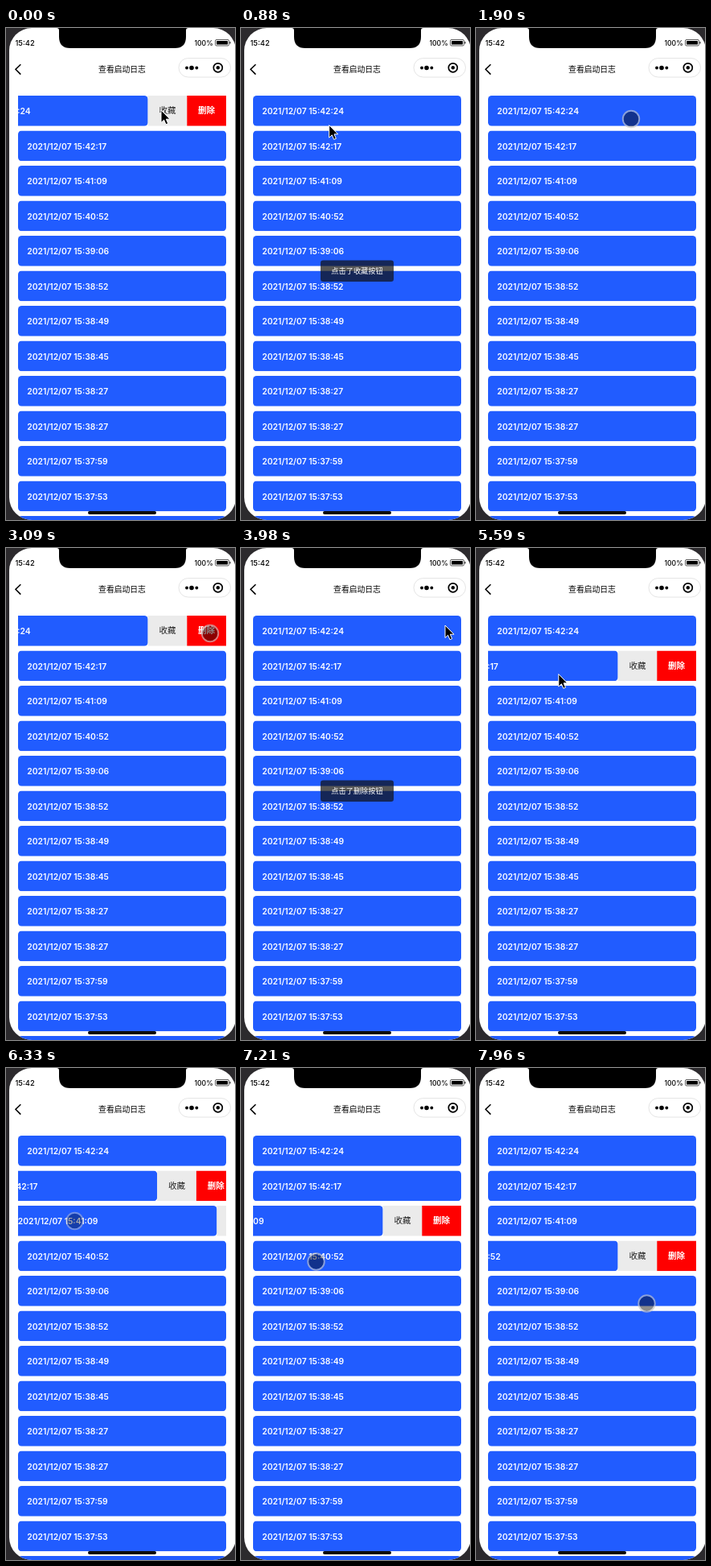
These frames come from a looping animation (285x611 px, 8 s). An HTML page:

```html
<!DOCTYPE html>
<html lang="zh">
<head>
<meta charset="utf-8">
<style>
  html, body { margin: 0; width: 100%; height: 100%; overflow: hidden; background: #2c2a2d; }
  svg { display: block; }
  text { font-family: Inter, "Noto Sans CJK SC", "Noto Sans CJK", sans-serif; dominant-baseline: central; }
  .mid { text-anchor: middle; }
  .log { font-size: 10.35px; font-weight: 600; fill: #fff; }
  .btn { font-size: 10.5px; font-weight: 500; }
  .bold { font-weight: 700; }
</style>
</head>
<body>
<svg width="285" height="611" viewBox="0 0 285 611">
  <defs>
    <clipPath id="screen"><rect x="4" width="282" height="611" rx="28"/></clipPath>
  </defs>
  <rect width="285" height="611" fill="#2c2a2d"/>
  <g clip-path="url(#screen)">
    <rect width="286" height="611" fill="#fff"/>
    <g id="rows"></g>
    <path d="M63 0Q66 0 66 3V11Q66 25 80 25H210Q224 25 224 11V3Q224 0 227 0Z"/>
    <rect x="102" y="600" width="85" height="4" rx="2" fill="#0a0a0a"/>
  </g>

  <text x="11.5" y="18.5" font-size="9.3" font-weight="500">15:42</text>
  <text x="234.5" y="19" font-size="8.6" font-weight="500">100%</text>
  <rect x="260.5" y="14.5" width="17" height="7.5" rx="1.5" fill="none" stroke="#333" stroke-width=".8"/>
  <rect x="262" y="16" width="14" height="4.5" rx=".5"/>
  <path d="M279 17v2.6" stroke="#333" stroke-width="1.2"/>

  <path d="M18.3 45.2L12 51.3L18.3 57.6" fill="none" stroke="#000" stroke-width="1.6"/>
  <text class="mid" x="144.5" y="51" font-size="9.8" font-weight="500">查看启动日志</text>
  <rect x="215" y="37.5" width="64.5" height="23.5" rx="11.7" fill="#fff" stroke="#ddd" stroke-width=".8"/>
  <circle cx="225" cy="49.5" r="1.9"/>
  <circle cx="231" cy="49.5" r="2.8"/>
  <circle cx="237.3" cy="49.5" r="1.9"/>
  <circle cx="263.8" cy="49.3" r="5.5" fill="none" stroke="#000" stroke-width="1.7"/>
  <circle cx="263.8" cy="49.3" r="2.2"/>

  <g id="toast">
    <rect x="99" y="288.6" width="91" height="26.4" rx="3.3" fill="#111" fill-opacity=".7"/>
    <text id="message" class="mid" x="144.5" y="301.8" font-size="9.2" fill="#fff"></text>
  </g>
  <g id="cursor">
    <g id="touch">
      <circle r="10.2" fill="none" stroke="#c4c4c4" stroke-opacity=".65" stroke-width="2"/>
      <circle r="9.3" fill="#000" fill-opacity=".45"/>
    </g>
    <path id="arrow" d="M0 -10V5.5L3.6 2.2L6 7.8L8.7 6.6L6.3 1.2H11Z" stroke="#fff"/>
  </g>
</svg>
<script>
const $ = id => document.getElementById(id);
const LOOP = 8000, STEP = 147.4, OPEN = 97.4, TOAST = 10;
const times = "42:24 42:17 41:09 40:52 39:06 38:52 38:49 38:45 38:27 38:27 37:59 37:53 37:50".split(" ");

$("rows").innerHTML = times.map((time, i) => `
  <svg x="15" y="${84 + 43.5 * i}" width="259" height="37.7"><g>
    <rect width="259" height="37.7" rx="4.5" fill="#215cff"/>
    <text class="log" x="11.3" y="19">2021/12/07 15:${time}</text>
    <rect x="259" width="48.7" height="37.7" fill="#ebebeb"/>
    <text class="btn mid" x="283.4" y="18.8" fill="#222">收藏</text>
    <rect x="307.7" width="48.7" height="37.7" fill="#f00"/>
    <text class="btn bold mid" x="332" y="18.8" fill="#fff">删除</text>
  </g></svg>`).join("");
const rows = [...$("rows").querySelectorAll("g")];

// Ticks of each touch: a swipe opens its row on release, and any release closes the open one.
const actions = [
  { press: -4, release: -2, row: 0 },
  { press: 1, release: 1, tap: "收藏" },
  { press: 13, release: 15, row: 0 },
  { press: 20, release: 22, tap: "删除" },
  { press: 34, release: 36, row: 1 },
  { press: 41, release: 43, row: 2 },
  { press: 48, release: 50, row: 3 },
  { press: 54, release: 56 }
];
// Pointer stops: tick, x, y
const stops = [
  [0, 193, 112], [2, 193, 112], [8, 68, 140], [13, 193, 113], [16, 90, 145],
  [18, 254, 106], [28, 254, 106], [34, 127, 147], [36, 78, 153], [41, 140, 187],
  [43, 85.5, 190], [48, 125, 238], [50, 62, 243], [54, 212.5, 292.5]
];

const smooth = v => {
  const p = Math.min(1, Math.max(0, v));
  return p * p * (3 - 2 * p);
};
const slide = ticks => smooth((ticks + .43) / 2);

function rowShift(row, tick) {
  return actions.reduce((sum, a, i) => a.row === row
    ? sum + OPEN * (slide(tick - a.release) - slide(tick - actions[i + 1].release))
    : sum, 0);
}

function pointer(tick) {
  const i = stops.findLastIndex(s => s[0] <= tick);
  const a = stops[i], b = stops[i + 1] || a;
  const f = (tick - a[0]) / (b[0] - a[0] || 1);
  return [1, 2].map(j => a[j] + (b[j] - a[j]) * f);
}

function draw(now) {
  const tick = Math.floor((now % LOOP + 17) / STEP);
  rows.forEach((row, i) => row.setAttribute("transform", `translate(${-rowShift(i, tick)})`));

  const tapped = actions.find(a => a.tap && tick >= a.release && tick < a.release + TOAST);
  $("toast").style.display = tapped ? "" : "none";
  $("message").textContent = tapped ? `点击了${tapped.tap}按钮` : "";

  const touch = actions.find(a => tick >= a.press && tick <= a.release);
  $("cursor").setAttribute("transform", `translate(${pointer(tick)})`);
  $("touch").style.opacity = !touch ? 0 : tick < touch.release ? 1 : .75;
  $("arrow").style.display = touch ? "none" : "";
}

const start = performance.now();
function loop() {
  draw(performance.now() - start);
  requestAnimationFrame(loop);
}
loop();
</script>
</body>
</html>
```
